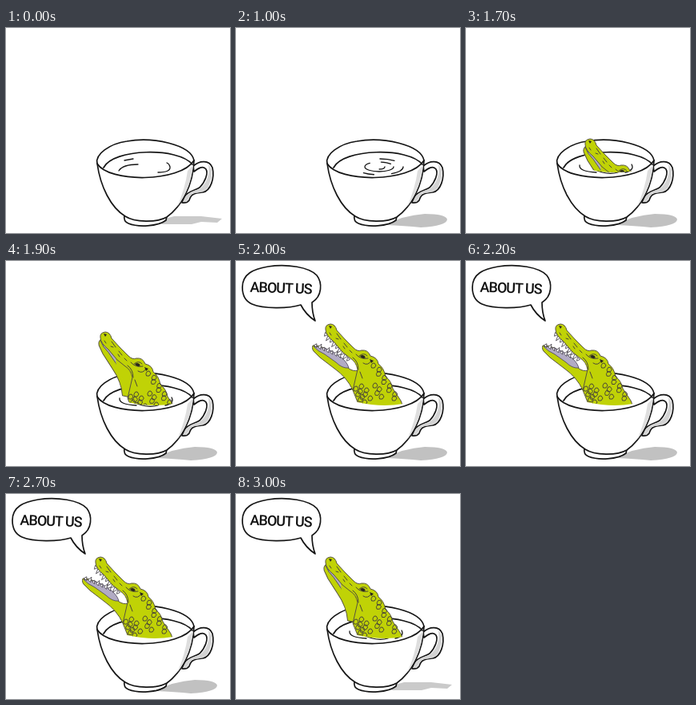
Write an HTML page that moves like this. It is 280 px wide and 257 px high and loops after 4 s.

```html
<!DOCTYPE html>
<html lang="en">
<head>
<meta charset="utf-8">
<style>
  html, body { margin: 0; width: 100%; height: 100%; overflow: hidden; background: #fff; }
  svg { display: block; width: 280px; height: 257px; }
  .ink { fill: none; stroke: #151515; stroke-width: 1.7; stroke-linecap: round; stroke-linejoin: round; }
  .paper { fill: #fff; }
  .thin { stroke-width: 1.3; }
  .skin { fill: #c0d206; stroke: #57533f; stroke-width: 1; stroke-linejoin: round; }
  .mark { fill: none; stroke: #4a4638; stroke-width: 1; stroke-linecap: round; stroke-linejoin: round; }
  .tooth { fill: #fff; stroke: #3b3640; stroke-width: .8; stroke-linejoin: round; }
  text { font: 500 18px Roboto, sans-serif; letter-spacing: -1px; text-anchor: middle; fill: #111; }
</style>
</head>
<body>
<svg viewBox="0 0 280 257">
  <defs>
    <clipPath id="water"><path d="M0 0H280V172L209 179Q182 184 152 177L122 174H0Z"/></clipPath>
  </defs>
  <path id="shadow"/>
  <path class="ink paper" fill-rule="evenodd" d="M234 173C242 166 254 165 258 175C261 188 256 204 246 206C234 207 231 209 229 216Q226 220 220 219L223 212C227 204 236 204 242 200C249 193 253 182 250 177C246 172 240 176 235 180Z"/>
  <path fill="#d3d3d3" d="M253 171Q262 180 252 201Q246 207 233 207Q228 213 226 218H221L225 210Q232 204 242 202Q256 190 253 171Z"/>
  <path class="ink paper" d="M148 235C147 240 148 243 153 245C165 250 190 249 200 241L201 236Z"/>
  <path class="ink paper" d="M114 170C111 158 130 145 151 142C183 136 231 146 235 166C234 198 219 224 201 237C189 244 161 244 149 236C131 225 118 199 114 170Z"/>
  <path fill="#dedede" d="M234 172Q231 201 214 224Q224 201 227 179Z"/>
  <path class="ink" d="M114 170C128 194 218 194 235 166M122 175C134 151 215 149 233 171"/>
  <g id="ripples" class="ink thin"></g>
  <g id="croc" clip-path="url(#water)"><g id="body">
    <g id="jaw">
      <path class="skin" d="M96 106Q94 111 99 115L105 121L122 134Q139 146 146 162L160 160L153 137Q146 139 140 134Q134 122 122 115Q110 108 101 106Z"/>
      <path fill="#b2abc4" stroke="#4b4558" stroke-width=".8" d="M97 107Q114 108 128 118Q139 126 141 134Q133 135 125 127L111 117Q102 113 97 107Z"/>
      <g id="lowerTeeth" class="tooth"></g>
    </g>
    <path id="cheek" fill="#c0d206" d="M131 111L147 121L156 137L149 152L132 124Z"/>
    <g id="upperTeeth" class="tooth"></g>
    <path class="skin" d="M112 86Q111 80 118 79Q124 79 126 87L137 99L147 109Q152 114 157 112Q165 111 168 119Q177 121 178 129Q185 134 187 145Q194 150 196 160L206 175L209 183L222 218H154L152 177L146 162L152 136Q150 126 143 122L133 114L122 101Q112 93 112 86Z"/>
    <path class="mark" d="M126 91L131 98M135 103L139 108M150 117Q156 124 165 122M154 119Q160 114 164 119M159 128Q165 132 169 125M155 139L158 147M146 121Q153 126 153 136M117 90l2 3M125 97l3 1M134 107l2 3M142 112l3 3"/>
    <path fill="#29251f" d="M116 81l4 1-2 3zM155 119q5-3 7 2q-4 3-7-2zM167 123l5 2-3 3z"/>
    <g id="scales" class="mark"></g>
  </g></g>
  <path id="bubble" class="ink paper" d="M8 33C8 16 22 10 40 7C64 3 92 8 101 18C108 27 108 44 95 52Q95 65 99 75Q87 67 81 55C65 60 34 60 20 54C11 50 8 42 8 33Z"/>
  <text id="speech" x="56" y="40" transform="rotate(2 56 34)">ABOUT US</text>
</svg>
<script>
const $ = id => document.getElementById(id);
const set = (id, name, value) => $(id).setAttribute(name, value);
const show = (id, visible) => set(id, 'visibility', visible ? 'visible' : 'hidden');

// A row of pointed teeth between two points, leaning by (dx, dy).
function teeth(x1, y1, x2, y2, count, dx, dy) {
  return Array.from({ length: count }, (_, i) => {
    const u = i / (count - 1), size = i % 2 ? 1 : .65;
    const x = x1 + (x2 - x1) * u, y = y1 + (y2 - y1) * u;
    return `<path d="M${x - 1.5} ${y - 1.5}L${x + dx * size} ${y + dy * size}L${x + 1.5} ${y + 1.5}Z"/>`;
  }).join('');
}
$('upperTeeth').innerHTML = teeth(113, 91, 141, 122, 9, -4, 5);
$('lowerTeeth').innerHTML = teeth(99, 107, 129, 120, 7, 3, -5);

// A staggered row of horny plates between two points.
function plates(x1, y1, x2, y2, count) {
  return Array.from({ length: count }, (_, i) => {
    const u = i / (count - 1), side = i % 2 ? 2 : -2;
    const x = x1 + (x2 - x1) * u + side, y = y1 + (y2 - y1) * u;
    return `<path d="M${x - 3} ${y}q1-4 4-3l2 3-2 3-3 0z"/>`;
  }).join('');
}
$('scales').innerHTML = plates(174, 131, 200, 172, 9) + plates(152, 160, 159, 177, 6) +
  plates(159, 157, 166, 172, 4) + plates(176, 156, 180, 170, 4);

function rings(step) {
  const grow = (step - 1) * .8;
  return [[7, 3, '8 30'], [18, 6, '48 14 12 9'], [30, 10, '18 22 13 48']].map(([rx, ry, dash]) =>
    `<ellipse cx="179" cy="174" rx="${rx + grow}" ry="${ry + grow / 4}" stroke-dasharray="${dash}"/>`).join('');
}
const calm = '<path d="M148 166L159 164M141 179Q146 171 165 171M190 181Q206 181 205 174Q204 170 201 169"/>';
const wake = '<path d="M142 172Q141 180 163 181M160 177Q176 185 190 181M199 181Q211 178 207 171"/>';

const thinShadow = 'M196 240L210 236L244 236L270 239L264 244L244 243L232 246L194 246Z';
const wideShadow = 'M187 247Q208 235 236 233Q262 233 264 240Q263 248 231 250Q211 248 187 247Z';

const rise = { 7: [44, 80], 8: [37, 60], 9: [20, 33], 10: [6, 10] };
const closedAngle = 20;

function draw(step) {
  const thin = step % 7 === 0;
  set('shadow', 'd', thin ? thinShadow : wideShadow);
  set('shadow', 'fill', thin ? '#cacaca' : '#c1c1c1');

  const emerged = step >= 7, talking = step >= 11;
  const [dx, dy] = rise[step] || [0, 0];
  const angle = talking ? closedAngle * Math.max(0, step - 18) / 3 : closedAngle;
  const closed = angle === closedAngle;
  show('croc', emerged);
  set('body', 'transform', `translate(${dx} ${dy})`);
  set('jaw', 'transform', `rotate(${angle} 152 142)`);
  show('cheek', emerged && closed);
  show('upperTeeth', emerged && !closed);
  show('lowerTeeth', emerged);
  show('bubble', talking);
  show('speech', talking);

  const splash = emerged && closed;
  $('ripples').innerHTML = step === 0 ? calm : splash ? wake : emerged ? '' : rings(step);
}

let lastStep = -1;
const start = performance.now();
function tick() {
  const time = (performance.now() - start) % 4000;
  const step = time < 1000 ? 0 : Math.min(21, Math.floor((time - 1000) / 100) + 1);
  if (step !== lastStep) draw(lastStep = step);
  requestAnimationFrame(tick);
}
tick();
</script>
</body>
</html>
```
